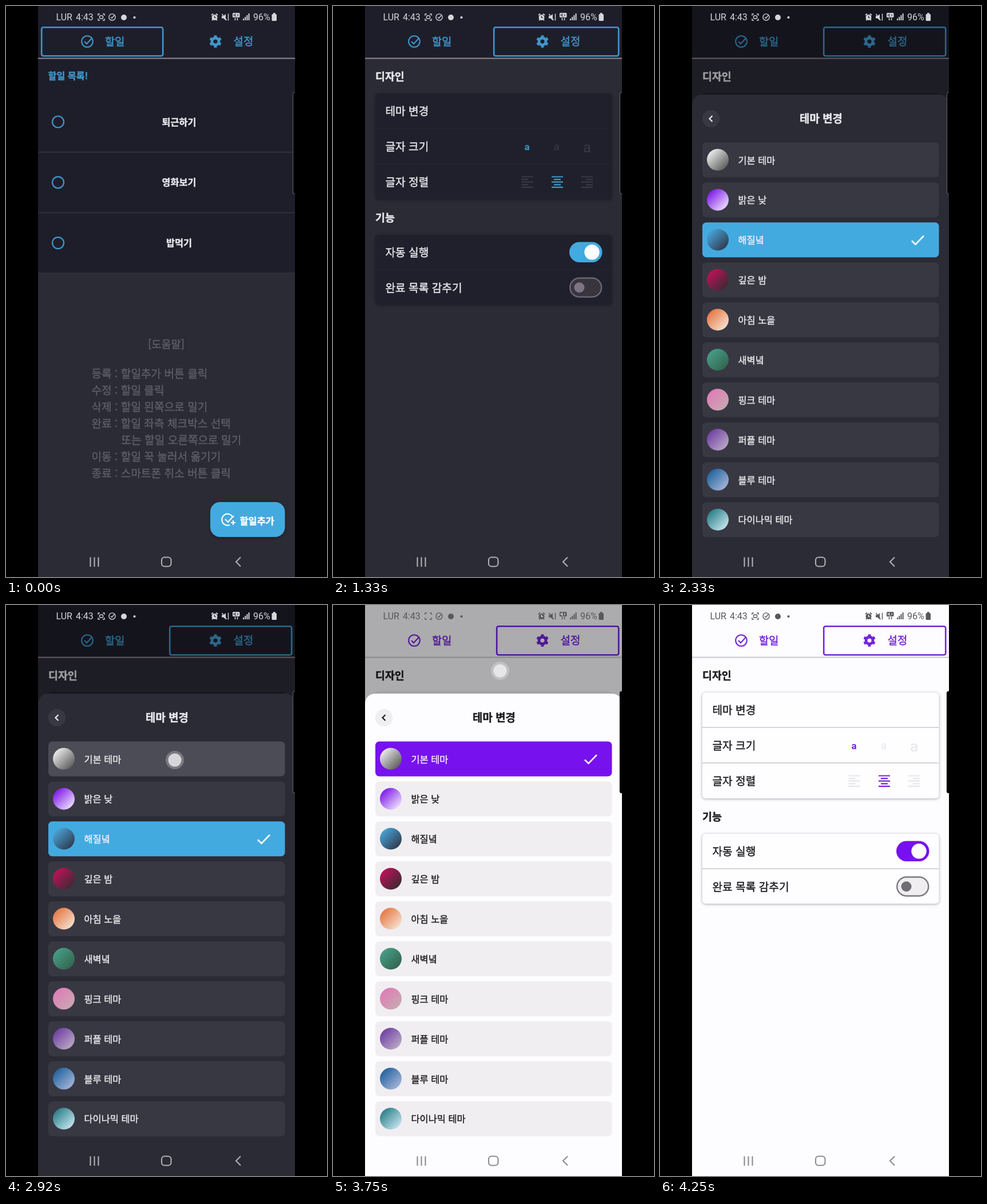
Write an HTML page that moves like this. It is 561x998 px and loops after 4580 ms.

```html
<!DOCTYPE html>
<html lang="ko">
<head>
<meta charset="utf-8">
<title>할일</title>
<style>
html, body { margin: 0; width: 100%; height: 100%; overflow: hidden; background: #000; }
svg {
  display: block;
  font-family: "Noto Sans CJK KR", "Noto Sans CJK", "Noto Sans", sans-serif;
  --bg: #2b2b36; --head: #1e1e2b; --card: #1f202c; --accent: #43aadf; --tab: #3f98cb;
  --text: #e9e9ed; --item: #383843; --line: #8d8890; --split: #22232f; --off: #393944;
  --status: #d6d6da; --nav: #b0b0b6; --edge: #5c5c64; --rim: #6d6672; --knob: #7e7584; --track: #38353f;
}
svg.light {
  --bg: #fdfcff; --head: #fdfcff; --card: #fefdff; --accent: #7711ee; --tab: #7322dc;
  --text: #1f1f23; --item: #f0eef1; --line: #cbc8cd; --split: #d6d4d9; --off: #e7e5e9;
  --status: #58575a; --nav: #8c8a8e; --edge: #000; --rim: #7b787e; --knob: #716d75; --track: #f0eef1;
}
text { fill: currentColor; }
.medium { stroke: currentColor; stroke-width: .4; }
.roboto { font-family: Roboto, sans-serif; }
.shadow { filter: drop-shadow(0 1.5px 2.5px #0005); }
</style>
</head>
<body>
<svg id="stage" width="561" height="998" viewBox="0 0 561 998"></svg>
<script>
const stage = document.getElementById('stage');
const v = name => `var(--${name})`;

const rect = (x, y, w, h, fill, r = 0, extra = '') =>
  `<rect x="${x}" y="${y}" width="${w}" height="${h}" rx="${r}" fill="${fill}" ${extra}/>`;
const disc = (x, y, r, fill, extra = '') =>
  `<circle cx="${x}" cy="${y}" r="${r}" fill="${fill}" ${extra}/>`;
const ring = (x, y, r, color, width) => disc(x, y, r, 'none', `stroke="${color}" stroke-width="${width}"`);
const line = (d, color, width, extra = '') =>
  `<path d="${d}" fill="none" stroke="${color}" stroke-width="${width}" ${extra}/>`;
// y is the optical middle of the line
const text = (s, x, y, size, color = v('text'), weight = 400, extra = '') =>
  `<text class="medium" x="${x}" y="${y + size * .37}" font-size="${size}" color="${color}"
    style="color:${color}" font-weight="${weight}" ${extra}>${s}</text>`;
const middle = 'text-anchor="middle"';

function todoPage() {
  const tasks = ['퇴근하기', '영화보기', '밥먹기'];
  const help = ['등록 : 할일추가 버튼 클릭', '수정 : 할일 클릭', '삭제 : 할일 왼쪽으로 밀기',
    '완료 : 할일 좌측 체크박스 선택', '또는 할일 오른쪽으로 밀기',
    '이동 : 할일 꾹 눌러서 옮기기', '종료 : 스마트폰 취소 버튼 클릭'];
  return rect(56, 92, 449, 374, v('head')) +
    text('할일 목록!', 73.5, 122, 16.2, v('tab'), 700) +
    tasks.map((s, i) => {
      const y = 202.5 + i * 105.8;
      return ring(91, y, 10, v('tab'), 2.2) + text(s, 302.5, y, 16.3, v('text'), 700, middle) +
        rect(56, y + 52, 449, 2, '#30303c');
    }).join('') +
    text('[도움말]', 280, 591, 18.6, '#5d5d68', 400, middle) +
    help.map((s, i) => text(s, i == 4 ? 201.5 : 149.5, 642.5 + i * 29.1, 19.15, '#5d5d68')).join('') +
    rect(357, 867, 130.5, 61, v('accent'), 17, 'class="shadow"') +
    line('M396 893a10 10 0 1 0-5 14M383 897l5 5l10-11M397 899v8M393 903h8', '#fff', 2.2) +
    text('할일추가', 408.5, 899.5, 16.4, '#fff', 700);
}

function alignIcon(x, side, color) {
  let d = '';
  for (let i = 0; i < 5; i++) {
    const w = i % 2 ? 12 : 20;
    d += `M${x + (20 - w) * side / 2} ${298.5 + i * 4.6}h${w}`;
  }
  return line(d, color, 2.2);
}

function settingsPage() {
  const letter = (x, y, size, color, weight) =>
    `<text class="roboto" x="${x}" y="${y}" font-size="${size}" font-weight="${weight}" style="color:${color}" ${middle}>a</text>`;
  const split = y => rect(74, y - 1, 413, 2, v('split'));
  return text('디자인', 74, 123, 18.4, v('text'), 700) + text('기능', 74, 370, 18.4, v('text'), 700) +
    rect(74, 153, 413.5, 185, v('card'), 6, 'class="shadow"') +
    rect(74, 400, 413.5, 122, v('card'), 6, 'class="shadow"') +
    split(214) + split(276) + split(461) +
    rect(74, 153, 413.5, 61, '#fff', 6, 'id="rowRipple"') +
    ['테마 변경', '글자 크기', '글자 정렬'].map((s, i) => text(s, 91.5, 184 + i * 62, 19.15)).join('') +
    ['자동 실행', '완료 목록 감추기'].map((s, i) => text(s, 91.5, 431 + i * 61.5, 19.15)).join('') +
    letter(339, 252, 17, v('tab'), 700) + letter(391, 252, 19, v('off'), 400) + letter(444, 255.5, 26, v('off'), 400) +
    alignIcon(329.5, 0, v('off')) + alignIcon(382, 1, v('tab')) + alignIcon(434, 2, v('off')) +
    rect(413, 412.5, 57.5, 35.5, v('accent'), 17.7) + disc(452.5, 430.3, 13.2, v('thumb, #fdfcff')) +
    rect(414.2, 475.5, 55, 33, v('track'), 16.5, `stroke="${v('rim')}" stroke-width="2.4"`) +
    disc(430.5, 492, 9, v('knob'));
}

function header() {
  const gear = disc(366, 62, 6, 'none', `stroke="${v('tab')}" stroke-width="4.8"`) +
    disc(366, 62, 9, 'none', `stroke="${v('tab')}" stroke-width="3.6" pathLength="12" stroke-dasharray="1" transform="rotate(15 366 62)"`);
  return rect(56, 0, 449, 92, v('head')) + rect(56, 90.5, 449, 2, v('line')) +
    rect(62.2, 37.2, 212, 50, 'none', 3, `id="marker" stroke="${v('tab')}" stroke-width="2.6"`) +
    ring(142, 62, 9.8, v('tab'), 2.1) + line('M137 62l4 4.2l9.5-10.5', v('tab'), 2.1) +
    text('할일', 173, 62.5, 18.7, v('tab')) + gear + text('설정', 397.5, 62.5, 18.9, v('tab'));
}

const themes = [
  ['기본 테마', '#e2e2e2', '#585858'], ['밝은 낮', '#8628e8', '#efe2ff'], ['해질녘', '#479bce', '#2f384a'],
  ['깊은 밤', '#b21456', '#3c2a32'], ['아침 노을', '#e67f4c', '#f6e2d2'], ['새벽녘', '#459a84', '#33634e'],
  ['핑크 테마', '#de7fb6', '#c8aab2'], ['퍼플 테마', '#7548a6', '#bcaac6'],
  ['블루 테마', '#2a69a2', '#a8b6da'], ['다이나믹 테마', '#36858f', '#c6e6f0']];

function sheet() {
  const top = i => 238.5 + i * 69.88;
  return rect(56, 155, 449, 880, v('bg'), 17) +
    disc(89, 197, 15.3, v('item')) + line('M91.5 192l-5 5l5 5', v('text'), 2.2) +
    text('테마 변경', 281.5, 197.5, 18.9, v('text'), 700, middle) +
    themes.map(([name, from, to], i) => `<linearGradient id="g${i}" x1=".1" y1=".1" x2=".9" y2=".9">
      <stop offset=".1" stop-color="${from}"/><stop offset="1" stop-color="${to}"/></linearGradient>` +
      rect(74, top(i), 413.5, 61, v('item'), 7, `id="item${i}"`) +
      (i ? '' : rect(74, top(0), 413.5, 61, '#fff', 7, 'id="itemRipple"')) +
      disc(101, top(i) + 30.3, 19, `url(#g${i})`) +
      text(name, 136.5, top(i) + 31, 16.4, v('text'), 400, `id="name${i}"`)).join('') +
    line('M440 270.5l6.5 6.5l14.5-15', '#fff', 2.6, 'id="tick"');
}

function statusBar() {
  const c = v('status');
  const label = (s, x) => `<text class="roboto" x="${x}" y="25" font-size="16" style="color:${c}">${s}</text>`;
  const bars = [0, 1, 2, 3].map(i => rect(414 + i * 3.2, 22 - i * 3, 2, 3 + i * 3, c)).join('');
  return label('LUR', 87.5) + label('4:43', 122) + label('96%', 432) +
    line('M161 17v-3h3M169 14h3v3M172 22v3h-3M164 25h-3v-3', c, 1.3) +
    rect(163.5, 17, 6, 5, 'none', 1.5, `id="rec" stroke="${c}" stroke-width="1.4"`) +
    ring(185.5, 19.5, 5.6, c, 1.4) + line('M183 19.5l2 2l4-5', c, 1.4) +
    disc(206, 20, 5, c) + disc(224.5, 20, 2.1, c) +
    disc(364.5, 20, 5, c) + line('M359 16l3-2.5M370 16l-3-2.5M360 25l1.5-1.5M369 25l-1.5-1.5', c, 1.8) +
    line('M364.5 17v3.5h2.5', v('head'), 1.2) +
    `<path d="M377 17.5h3l4-3.5v11l-4-3.5h-3z" fill="${c}"/>` + line('M377.5 14l8 11M388.5 13.5v12', c, 1.4) +
    rect(396, 12, 12.5, 8, c, 1.5) + line('M398.5 14v4M402 14h-1.5v4h2M405 14v4', v('head'), 1) +
    line('M400.5 21v4M404.5 21v4', c, 1.6) + bars +
    rect(464.5, 14, 8.5, 12, c, 1.5) + rect(467, 12, 3.5, 3, c);
}

const navBar = () => line('M147.5 963.5v16.5M154.5 963.5v16.5M161.5 963.5v16.5', v('nav'), 2.1) +
  rect(272, 963.5, 16.5, 16, 'none', 5, `stroke="${v('nav')}" stroke-width="2.1"`) +
  line('M410 963.5l-8 8l8 8', v('nav'), 2.1);

stage.innerHTML = `<clipPath id="phone">${rect(56, 0, 449, 998, '#000')}</clipPath>
  ${rect(0, 0, 561, 998, '#000')}
  <g clip-path="url(#phone)">
    ${rect(56, 0, 449, 998, v('bg'))}
    <g id="todo">${todoPage()}</g><g id="settings">${settingsPage()}</g>
    ${header()}
    ${rect(56, 0, 449, 998, '#000', 0, 'id="scrim"')}
    <g id="sheet">${sheet()}</g>
    ${statusBar()}${navBar()}
    ${rect(501.5, 151, 9, 177.5, '#000', 3, `stroke="${v('edge')}" stroke-width="1.2"`)}
    <g id="touch">${disc(0, 0, 16, '#fff', 'opacity=".25"')}${disc(0, 0, 11.5, '#f0eef1', 'opacity=".8"')}</g>
  </g>`;

const el = {};
stage.querySelectorAll('[id]').forEach(e => el[e.id] = e);
const set = (id, name, value) => el[id].setAttribute(name, value);
const clamp = x => Math.min(1, Math.max(0, x));
const span = (t, a, b) => clamp((t - a) / (b - a));
const smooth = p => p * p * (3 - 2 * p);
const between = (t, a, b) => t >= a && t < b;

const LOOP = 4580, STEP = 1000 / 12;
// start, x, y, duration
const taps = [[410, 392, 62, 270], [1740, 295, 184, 270], [2740, 295, 271, 360], [3660, 292, 115, 270]];

function draw(t) {
  const light = t > 2990;
  stage.setAttribute('class', light ? 'light' : '');

  const page = 1 - (1 - span(t, 470, 850)) ** 3;
  set('todo', 'transform', `translate(${-449 * page})`);
  set('settings', 'transform', `translate(${449 * (1 - page)})`);
  const left = 62.2 + 219 * page + 5 * span(t, 1340, 1490);
  const right = 274.2 + 225 * page;
  set('marker', 'x', left);
  set('marker', 'width', right - left);

  const open = smooth(span(t, 2060, 2325)) - smooth(span(t, 3750, 3932));
  set('sheet', 'transform', `translate(0 ${843 * (1 - open)})`);
  set('sheet', 'visibility', open > 0 ? 'visible' : 'hidden');
  set('scrim', 'opacity', .32 * (span(t, 2060, 2325) - span(t, 3750, 3985)));

  const chosen = light ? 0 : 2;
  for (const i of [0, 2]) {
    set('item' + i, 'fill', v(i == chosen ? 'accent' : 'item'));
    el['name' + i].style.color = i == chosen ? '#f4eefc' : v('text');
  }
  set('tick', 'transform', `translate(0 ${chosen * 69.88})`);
  set('rowRipple', 'opacity', between(t, 1740, 2070) ? .06 : 0);
  set('itemRipple', 'opacity', between(t, 2740, 3330) ? .1 : 0);
  set('rec', 'opacity', between(t, 2990, 4245) ? 0 : 1);

  const tap = taps.find(([start, , , life]) => between(t, start, start + life));
  set('touch', 'opacity', 0);
  if (tap) {
    const age = t - tap[0];
    set('touch', 'transform', `translate(${tap[1]} ${tap[2]})`);
    set('touch', 'opacity', clamp(Math.min(.5 + age / 160, (tap[3] - age) / 140)));
  }
}

// The screen advances twelve times a second
const start = performance.now();
function tick() {
  const t = (performance.now() - start) % LOOP;
  draw(Math.floor((t + 4) / STEP) * STEP);
  requestAnimationFrame(tick);
}
tick();
</script>
</body>
</html>
```
